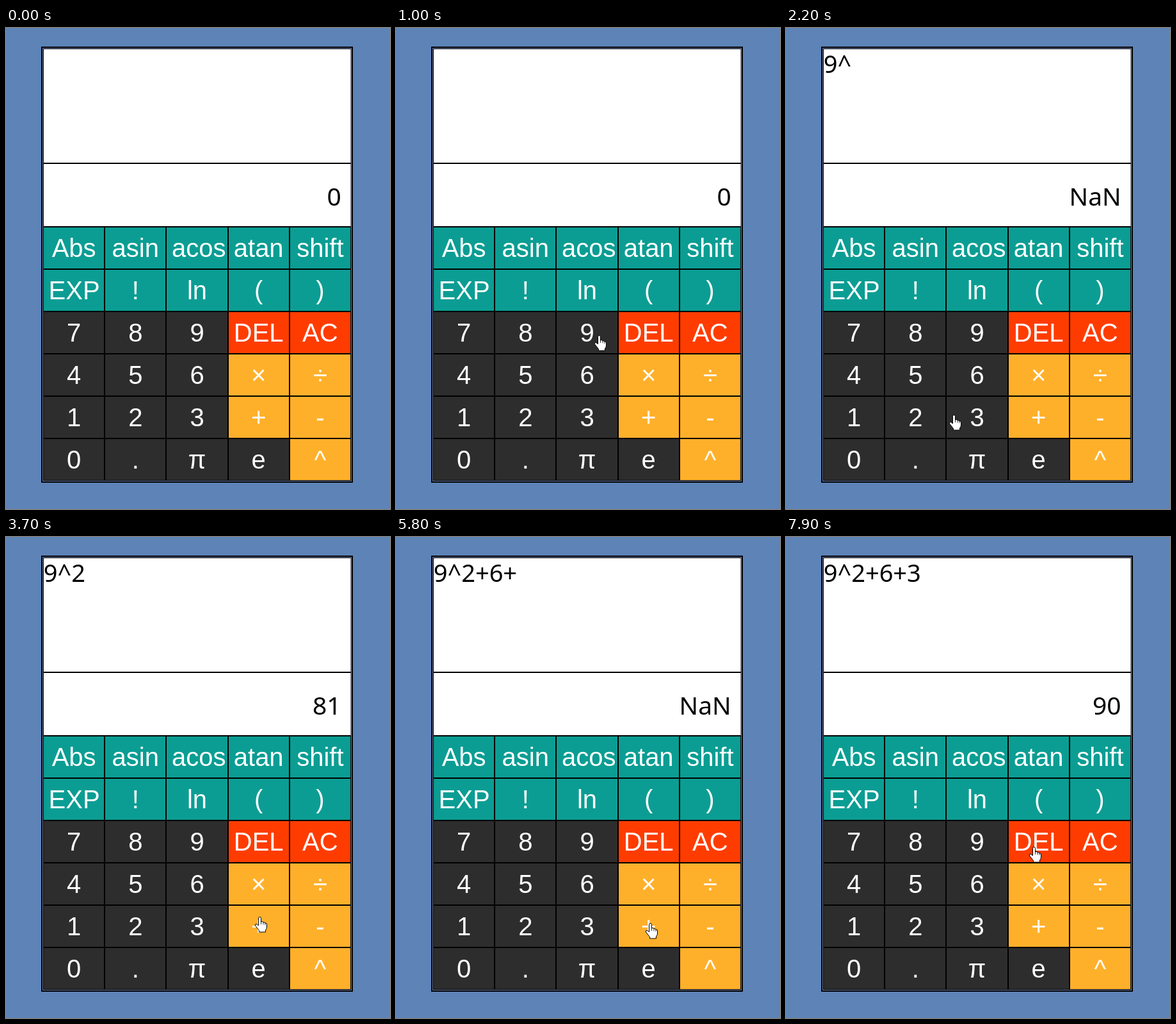
An HTML page for the animation above (8 s loop, 600 by 750 pixels).

```html
<!DOCTYPE html>
<html lang="en">
<head>
<meta charset="utf-8">
<title>Calculator</title>
<style>
  html, body { margin: 0; width: 100%; height: 100%; overflow: hidden; background: #5d83b7; }
  svg { display: block; width: 600px; height: 750px; }
  .key { font: 40px "Liberation Sans", Arial, sans-serif; fill: #fff; }
  .display { font: 38px "Noto Sans", "Open Sans", sans-serif; }
  #result { font-size: 39px; text-anchor: end; }
</style>
</head>
<body>
<svg viewBox="0 0 600 750">
  <rect x="55" y="29" width="487" height="680"/>
  <rect x="57.5" y="31.5" width="482" height="675" fill="none" stroke="#7486b4"/>
  <rect x="59" y="33" width="479.5" height="177" fill="#fff"/>
  <rect x="59" y="212" width="479.5" height="97" fill="#fff"/>
  <text id="expression" class="display" x="58.7" y="69.5"></text>
  <text id="result" class="display" x="523.7" y="277"></text>
  <g id="keys"></g>
  <g id="cursor" fill="#fff" stroke="#000" stroke-linejoin="round">
    <path d="M-2.5 1.5Q-2.5-.5-.5-.5T1.500 1.500V7Q4.500 5.500 5 8Q7.500 7 8 9Q10.500 8.500 10.500 11V15Q10.500 18 8.500 20V23H-1.500V20.500L-7.500 13Q-8.500 10.500-6 10.500Q-4.500 10.500-2.500 13Z"/>
    <path d="M1.500 7V11M5 8V11.500M8 9V12" fill="none" stroke-width=".8"/>
  </g>
</svg>
<script>
const $ = id => document.getElementById(id);
const TEAL = '#0b9d93', DARK = '#2d2d2d', RED = '#ff3c00', ORANGE = '#ffb02b';
const LEFT = 58, TOP = 310, CELL_W = 96.2, CELL_H = 66;
const LOOP = 8000, STEP = 100;

const rows = [
  'Abs asin acos atan shift',
  'EXP ! ln ( )',
  '7 8 9 DEL AC',
  '4 5 6 × ÷',
  '1 2 3 + -',
  '0 . π e ^'
];

// time, expression, result
const entries = [
  [0, '', '0'],
  [1100, '9', '9'],
  [1900, '9^', 'NaN'],
  [2500, '9^2', '81'],
  [4200, '9^2+', 'NaN'],
  [4800, '9^2+6', '87'],
  [5800, '9^2+6+', 'NaN'],
  [6500, '9^2+6+3', '90']
];

// start, end, x, y: each move begins where the previous one ended
const moves = [
  [300, 300, 430, 690],
  [300, 900, 318, 480],
  [1200, 1700, 487, 671],
  [1900, 2200, 263, 604],
  [2200, 2400, 208, 603],
  [3300, 3700, 397, 593],
  [3700, 4000, 398, 599],
  [4300, 4700, 283, 537],
  [5300, 5700, 398, 603],
  [6100, 6500, 299, 601],
  [7100, 7900, 388, 484]
];

function add(tag, attrs, content = '') {
  const node = document.createElementNS('http://www.w3.org/2000/svg', tag);
  for (const name in attrs) node.setAttribute(name, attrs[name]);
  node.textContent = content;
  return $('keys').appendChild(node);
}

function keyColor(row, col) {
  if (row < 2) return TEAL;
  if (col < 3 || row === 5 && col === 3) return DARK;
  return row === 2 ? RED : ORANGE;
}

function buildKeys() {
  rows.forEach((labels, row) => labels.split(' ').forEach((label, col) => {
    const x = LEFT + col * CELL_W, y = TOP + row * CELL_H;
    const x1 = Math.round(x) + 1, x2 = Math.round(x + CELL_W) - 1;
    add('rect', { x: x1, y: y + 1, width: x2 - x1, height: CELL_H - 2, fill: keyColor(row, col) });
    const text = add('text', { class: 'key', y: y + 47 }, label);
    // wide labels overflow to the right of the key padding
    const centered = (CELL_W - text.getComputedTextLength()) / 2;
    text.setAttribute('x', x + Math.max(centered, 8.6));
  }));
}

const ease = p => p * p * (3 - 2 * p);

function cursorAt(time) {
  let [, , x, y] = moves[0];
  for (const [start, end, toX, toY] of moves.slice(1)) {
    if (time < start) break;
    const p = ease(Math.min(1, (time - start) / (end - start)));
    x += (toX - x) * p;
    y += (toY - y) * p;
  }
  return [x, y];
}

function draw(now) {
  const time = Math.floor(now % LOOP / STEP) * STEP;
  const [, expression, result] = entries.findLast(([start]) => time >= start);
  $('expression').textContent = expression;
  $('result').textContent = result;
  $('cursor').setAttribute('visibility', time < moves[0][0] ? 'hidden' : 'visible');
  $('cursor').setAttribute('transform', `translate(${cursorAt(time)})`);
  requestAnimationFrame(draw);
}

buildKeys();
requestAnimationFrame(draw);
</script>
</body>
</html>
```
